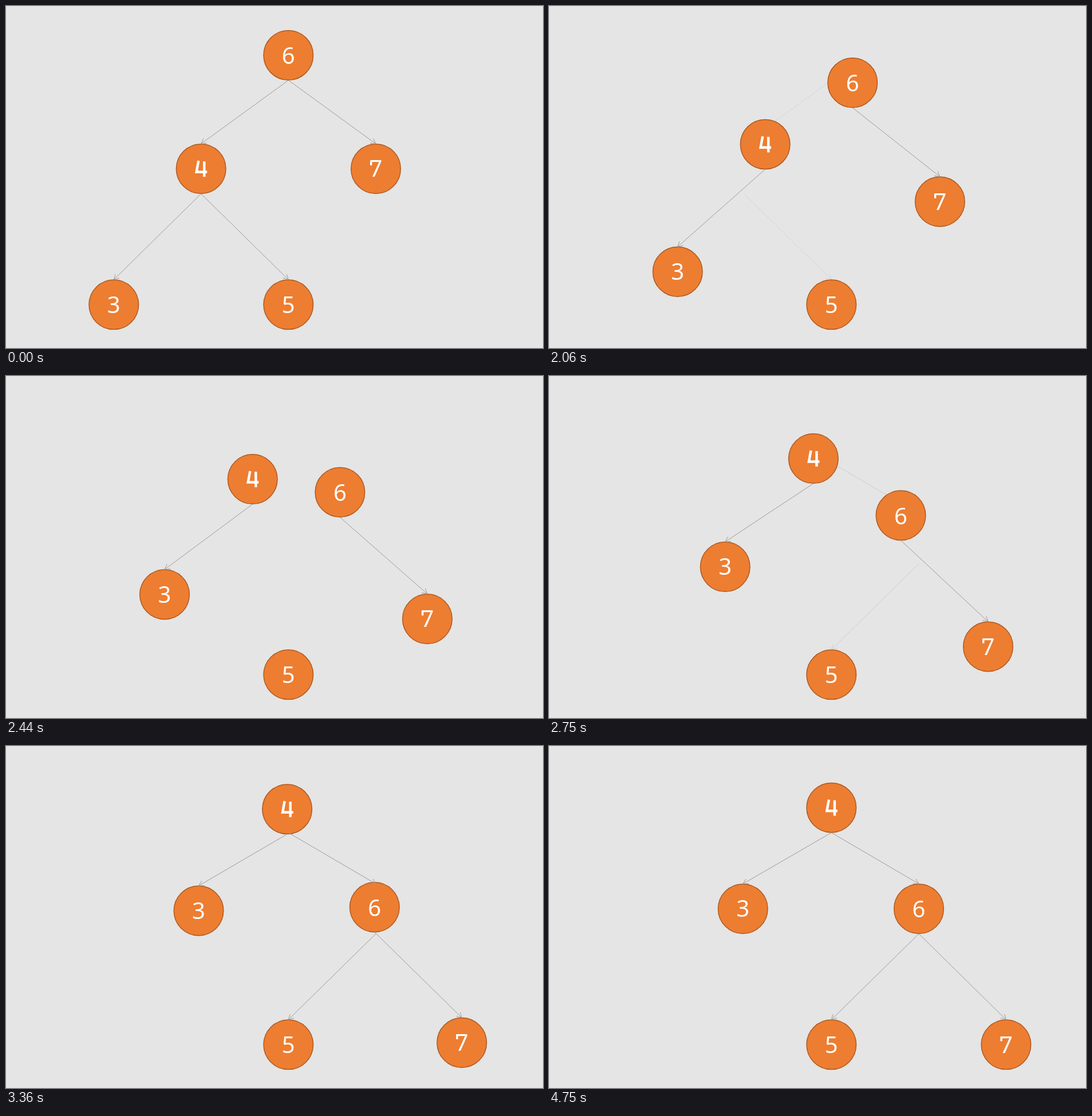
Animation of 938 by 597 pixels, one loop 5150 ms. Source, as an HTML page with a canvas:

```html
<!DOCTYPE html>
<html lang="en">
<head>
<meta charset="utf-8">
<title>Tree rotation</title>
<style>
  html, body { margin: 0; width: 100%; height: 100%; overflow: hidden; background: #e5e5e5; }
  canvas { display: block; }
</style>
</head>
<body>
<canvas id="stage" width="938" height="597"></canvas>
<script>
const ctx = document.getElementById('stage').getContext('2d');
const LOOP = 5150, START = 1750, STEP = 76.4, LAST = 25;
const RADIUS = 43.3;

// Start and end centre of each node.
const NODES = {
  3: { from: [188.3, 521.3], to: [338.7, 284.2] },
  4: { from: [340.7, 284.2], to: [493.3, 107.7] },
  5: { from: [493.3, 521.3], to: [493.3, 521.3] },
  6: { from: [493.3, 86], to: [646, 284.2] },
  7: { from: [646, 284.2], to: [798.4, 521.3] }
};

// Eased progress by step: [step, progress].
const EASE = [[-1, 0], [0, .013], [4, .242], [6, .387], [9, .59],
  [13, .794], [17, .922], [20, .977], [25, 1]];

const clamp = v => Math.max(0, Math.min(1, v));
const slope = (a, b) => (b[1] - a[1]) / (b[0] - a[0]);

function tangent(i) {
  if (i === EASE.length - 1) return 0;
  if (i === 0) return slope(EASE[0], EASE[1]);
  return slope(EASE[i - 1], EASE[i + 1]);
}

function progress(step) {
  if (step < 0) return 0;
  if (step >= LAST) return 1;
  const i = EASE.findIndex((key, k) => step >= key[0] && step < EASE[k + 1][0]);
  const [x0, y0] = EASE[i], [x1, y1] = EASE[i + 1];
  const h = x1 - x0, u = (step - x0) / h, v = 1 - u;
  return y0 * v * v * (1 + 2 * u) + y1 * u * u * (3 - 2 * u)
    + h * u * v * (tangent(i) * v - tangent(i + 1) * u);
}

function place(id, p) {
  const { from, to } = NODES[id];
  return from.map((v, i) => v + (to[i] - v) * p);
}

function polyline(points) {
  ctx.beginPath();
  points.forEach(([x, y]) => ctx.lineTo(x, y));
  ctx.stroke();
}

function arrow(parent, child, p, alpha = 1) {
  if (alpha <= 0) return;
  const [px, py] = place(parent, p), [cx, cy] = place(child, p);
  const x0 = px, y0 = py + RADIUS + .3, x1 = cx, y1 = cy - RADIUS - .3;
  const angle = Math.atan2(y1 - y0, x1 - x0);
  const barb = side => [x1 - 10 * Math.cos(angle + side), y1 - 10 * Math.sin(angle + side)];
  ctx.globalAlpha = alpha;
  ctx.strokeStyle = '#9b9b9b';
  ctx.lineWidth = 1;
  polyline([[x0, y0], [x1, y1]]);
  polyline([barb(.5), [x1, y1], barb(-.5)]);
  ctx.globalAlpha = 1;
}

function digit(id, x, y) {
  ctx.save();
  ctx.translate(x, y);
  ctx.fillStyle = ctx.strokeStyle = '#fff';
  ctx.lineWidth = 4.4;
  if (id === '4') {
    // Open-topped four
    polyline([[-4.4, -14], [-8, 5.5], [10.5, 5.5]]);
    polyline([[5.6, -13], [5.6, 14]]);
  } else {
    ctx.fillText(id, 0, id === '6' ? 15.2 : 14.2);
    if (id === '7') {
      ctx.lineWidth = 3.4;
      polyline([[-8.3, -14], [-8.3, -6]]);
    }
  }
  ctx.restore();
}

function node(id, p) {
  const [x, y] = place(id, p);
  ctx.beginPath();
  ctx.arc(x, y, RADIUS, 0, 2 * Math.PI);
  ctx.fillStyle = '#ed7d31';
  ctx.fill();
  ctx.strokeStyle = '#ae5a21';
  ctx.lineWidth = 1.5;
  ctx.stroke();
  digit(id, x, y);
}

function draw(time) {
  const step = Math.floor((time - START) / STEP);
  const p = progress(step);
  const fadeOut = step < 0 ? 1 : clamp(1 - (step + .5) / 5.8);
  const fadeIn = clamp((step - 10) / 9);

  ctx.fillStyle = '#e5e5e5';
  ctx.fillRect(0, 0, 938, 597);
  ctx.font = '500 40px "Noto Sans", sans-serif';
  ctx.textAlign = 'center';

  ['3', '4', '5', '7'].forEach(id => node(id, p));
  arrow(6, 4, 0, fadeOut);
  arrow(4, 5, 0, fadeOut);
  node('6', p);
  arrow(4, 3, p);
  arrow(6, 7, p);
  arrow(4, 6, 1, fadeIn);
  arrow(6, 5, 1, fadeIn);
}

function tick() {
  draw(performance.now() % LOOP);
  requestAnimationFrame(tick);
}
tick();
</script>
</body>
</html>
```
